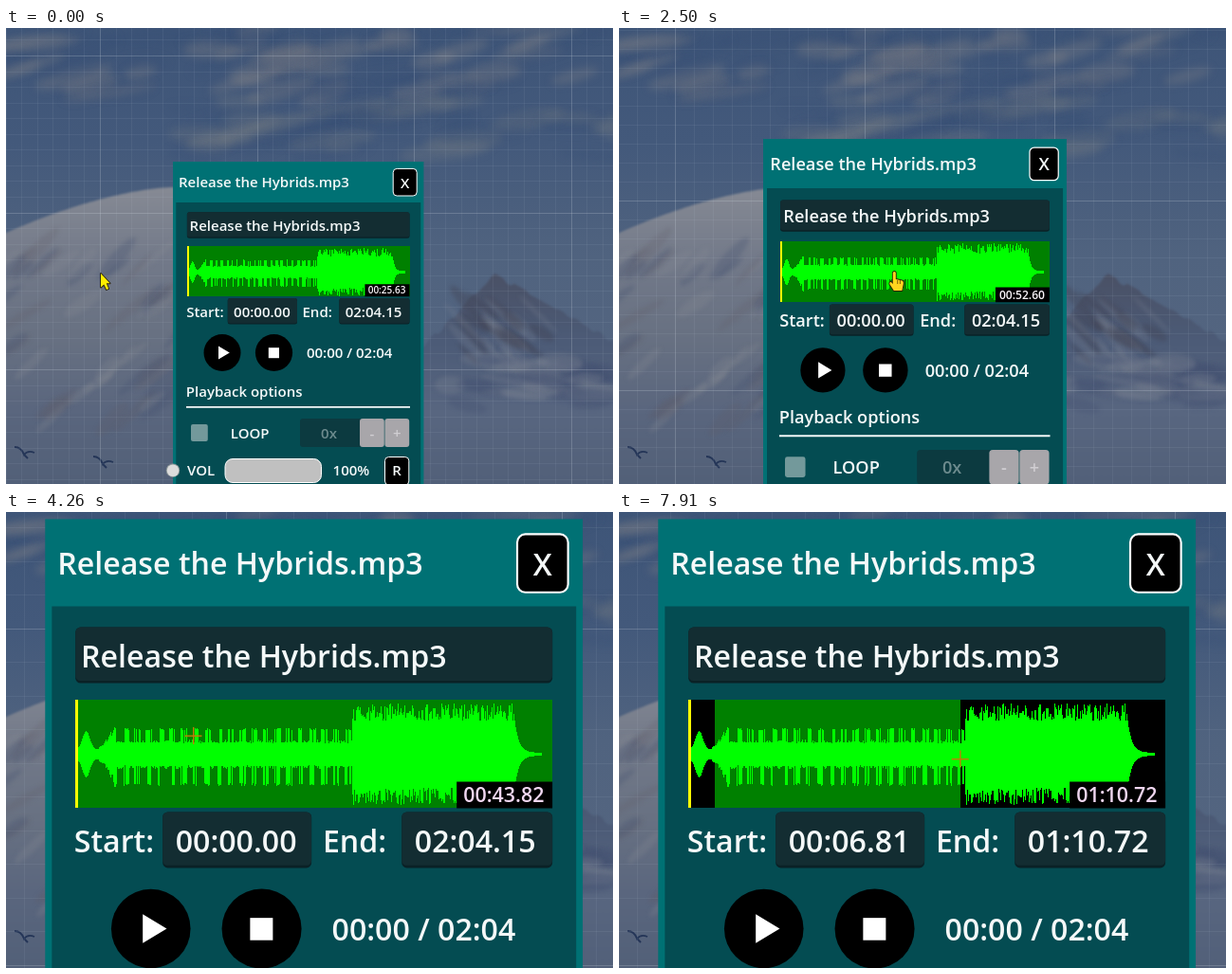
Recreate the animation shown at these times as an HTML page with a canvas. Size 640 px wide and 481 px high, loop 8000 ms.

```html
<!DOCTYPE html>
<html lang="en">
<head>
<meta charset="utf-8">
<title>Audio clip trimming</title>
<style>
html, body { margin: 0; width: 100%; height: 100%; overflow: hidden; background: #46597a; }
canvas { display: block; }
</style>
</head>
<body>
<canvas id="stage" width="640" height="481"></canvas>
<script>
const W = 640, H = 481, LOOP = 8000, STEP = 125.5;
const LENGTH = 124.15, START = 6.81, END = 70.72, IDLE = 25.63;
const FILE = 'Release the Hybrids.mp3';
const ctx = document.getElementById('stage').getContext('2d');

// Waveform box in panel units
const WAVE = { x: 14.9, y: 89, w: 234.6, h: 53.3 };

// Pointer stops: step, x, y
const PATH = [
  [9, 99, 258], [10, 104, 258], [17, 290.3, 257], [23, 290.3, 257], [23.3, 298.85, 263],
  [31, 298.85, 263], [33, 265.4, 256], [34, 197.5, 236], [38, 111, 249], [41, 100.8, 255.5],
  [50, 101, 256], [51, 105.95, 256], [52, 184, 262], [59, 359.7, 260.5]
];

const clamp = (v, lo, hi) => Math.min(hi, Math.max(lo, v));
const mix = (a, b, k) => a + (b - a) * k;
const smooth = k => k * k * (3 - 2 * k);
const noise = n => { const v = Math.sin(n * 127.1 + 11.7) * 43758.5453; return v - Math.floor(v); };
const two = n => String(n).padStart(2, '0');
function clock(sec) {
  const c = Math.round(sec * 100);
  return two(Math.floor(c / 6000)) + ':' + two(Math.floor(c / 100) % 60) + '.' + two(c % 100);
}

function pointerAt(n) {
  const i = PATH.findIndex(p => p[0] > n);
  if (i === 0) return PATH[0].slice(1);
  if (i < 0) return PATH.at(-1).slice(1);
  const [a, ax, ay] = PATH[i - 1], [b, bx, by] = PATH[i];
  const k = smooth((n - a) / (b - a));
  return [mix(ax, bx, k), mix(ay, by, k)];
}

// Each wheel notch enlarges by 1.1 around a slowly drifting focus
function viewAt(n) {
  const level = n < 24 ? clamp(n - 18, 0, 5) : n < 27 ? 7 : 8;
  const s = 1.1 ** level, fx = 289 + 0.6 * level, fy = 254 + 0.46 * level;
  return { level, s, x: mix(fx, 176, s), y: mix(fy, 141, s) };
}

// The readout trails the pointer and holds while zooming
function hoverAt(n) {
  const m = n < 24 ? Math.min(n, 18) : n, v = viewAt(m);
  const p = ((pointerAt(m - 0.7)[0] - v.x) / v.s - WAVE.x) / WAVE.w;
  return p > 0 ? p * LENGTH : IDLE;
}

function fade(g, y0, y1, ...colours) {
  const f = g.createLinearGradient(0, y0, 0, y1);
  colours.forEach((c, i) => f.addColorStop(i / (colours.length - 1), c));
  return f;
}

function makeScenery() {
  const c = document.createElement('canvas');
  c.width = W; c.height = H;
  const g = c.getContext('2d');

  const ridge = (from, to, height, fill) => {
    g.beginPath();
    g.moveTo(from, H);
    for (let x = from; x <= to; x += 4) g.lineTo(x, height(x));
    g.lineTo(to, H);
    g.fillStyle = fill;
    g.fill();
  };
  // Scattered brush strokes inside a box
  const dabs = (count, seed, [x, y, w, h], size, tilt, colours) => {
    for (let i = 0; i < count; i++) {
      const r = k => noise(seed + i * 5 + k);
      g.fillStyle = colours[i % colours.length];
      g.beginPath();
      g.ellipse(x + r(1) * w, y + r(2) * h, size * (0.5 + r(3)), size * (0.12 + 0.2 * r(4)), tilt + r(5) * 0.4 - 0.2, 0, 7);
      g.fill();
    }
  };
  const left = x => 168 + 48 * Math.max(0, 1 - x / 176) ** 1.6;
  const right = x => 258 + Math.abs(x - 515) * (x < 515 ? 1 : 0.55) + 6 * noise(Math.floor(x / 8));

  g.fillStyle = fade(g, 0, H, '#3e5578', '#43597b', '#50637f', '#546580', '#4f5f7a');
  g.fillRect(0, 0, W, H);
  g.filter = 'blur(4px)';
  dabs(70, 40, [-20, 0, 680, 70], 34, -0.15, ['rgba(140,138,136,.28)', 'rgba(52,78,118,.25)']);
  dabs(40, 700, [180, 75, 480, 60], 34, -0.1, ['rgba(140,138,136,.2)', 'rgba(52,78,118,.2)']);
  g.filter = 'blur(1px)';
  ridge(-10, 440, left, fade(g, 168, H, '#868a94', '#727989', '#687182', '#5a667e', '#526078'));
  ridge(420, 650, right, fade(g, 255, H, '#4a5064', '#4c5b77', '#586680', '#526079'));
  g.filter = 'blur(2px)';
  dabs(45, 1300, [-10, 235, 190, 180], 24, -0.7, ['rgba(135,139,148,.25)', 'rgba(70,84,112,.3)', 'rgba(96,92,100,.2)']);
  dabs(26, 1900, [475, 285, 90, 75], 20, 0.75, ['rgba(66,68,86,.4)', 'rgba(125,132,148,.25)']);
  dabs(30, 2500, [430, 350, 220, 50], 30, 0.1, ['rgba(125,132,148,.28)', 'rgba(66,82,112,.3)']);
  g.filter = 'none';

  g.strokeStyle = '#243557';
  g.lineWidth = 1.9;
  for (const [x, y] of [[19, 447], [102, 457]]) {
    g.beginPath();
    g.moveTo(x - 10, y - 5);
    g.quadraticCurveTo(x - 3, y - 5, x, y + 3);
    g.quadraticCurveTo(x + 4, y - 2, x + 11, y + 1);
    g.moveTo(x, y + 3);
    g.lineTo(x + 4, y + 7);
    g.stroke();
  }
  return c;
}
const scenery = makeScenery();

function grid(v) {
  const cell = 16.55 * v.s;
  for (let i = -40; i <= 40; i++) {
    ctx.fillStyle = i % 10 ? 'rgba(200,212,225,.075)' : 'rgba(205,215,225,.23)';
    ctx.fillRect(Math.floor(v.x + 89 * v.s + i * cell), 0, 1, H);
    ctx.fillRect(0, Math.floor(v.y + 54 * v.s + i * cell), W, 1);
  }
}

// Helpers in panel units
function box(x, y, x2, y2, fill, r = 0, border) {
  ctx.beginPath();
  ctx.roundRect(x, y, x2 - x, y2 - y, r);
  ctx.fillStyle = fill;
  ctx.fill();
  if (border) {
    ctx.strokeStyle = border;
    ctx.lineWidth = 1;
    ctx.stroke();
  }
}
function text(str, x, y, { size = 15, fill = '#f4f8f8', align = 'left' } = {}) {
  ctx.font = `600 ${size}px "Open Sans", "Noto Sans", sans-serif`;
  ctx.textAlign = align;
  ctx.fillStyle = fill;
  ctx.fillText(str, x, y);
}
function field(x, y, x2, y2) {
  box(x, y, x2, y2, '#0a2126', 2.5);
  box(x, y, x2, y2 - 1.2, '#132d32', 2.5);
}
function button(label, x, y, x2, y2, base) {
  box(x, y, x2, y2, '#000', 4, '#fff');
  text(label, (x + x2) / 2, base, { align: 'center' });
}
function disc(x, y, r, fill) {
  ctx.beginPath();
  ctx.arc(x, y, r, 0, 7);
  ctx.fillStyle = fill;
  ctx.fill();
}

// Loudness above (side 0) or below (side 1) the axis, p from 0 to 1
function loudness(p, side) {
  const n = noise(Math.floor(p * 470) + side * 900);
  if (p < 0.048) return 0.08 + 0.34 * Math.exp(-(((p - 0.022) / 0.011) ** 2));
  if (p < 0.085) return 0.12 + 0.58 * ((p - 0.048) / 0.037) ** 1.6 * (0.5 + 0.5 * n);
  if (p < 0.58) {
    const beat = (p / 0.0245) % 1;
    return beat < 0.55 && n > 0.35 ? (0.48 + side * 0.1) * (0.85 + 0.15 * n) : 0.2 + 0.06 * n;
  }
  if (p < 0.922) return 0.6 + 0.33 * n;
  return 0.02 + 0.5 * Math.exp((0.922 - p) * 110);
}

// Drawn on whole pixels so that the bars stay crisp
function wave(v, start, end) {
  const x = Math.round(v.x + WAVE.x * v.s), y = Math.round(v.y + WAVE.y * v.s);
  const w = Math.round(WAVE.w * v.s), h = Math.round(WAVE.h * v.s);
  const px = sec => Math.round(sec / LENGTH * w);
  const mid = Math.round(y + h / 2);
  ctx.fillStyle = '#000';
  ctx.fillRect(x, y, w, h);
  ctx.fillStyle = '#008000';
  ctx.fillRect(x + px(start), y, px(end) - px(start), h);
  ctx.fillStyle = '#0f0';
  for (let i = 0; i < w * 0.978; i++) {
    const up = Math.round(loudness(i / w, 0) * h / 2), down = Math.round(loudness(i / w, 1) * h / 2);
    ctx.fillRect(x + i, mid - up, 1, up + down + 1);
  }
  ctx.fillStyle = '#ff0';
  ctx.fillRect(x, y, Math.round(1 + v.s), h);
}

function panel(v, start, end, hover) {
  const local = () => { ctx.save(); ctx.translate(v.x, v.y); ctx.scale(v.s, v.s); };

  local();
  box(0, 0, 264.4, 400, '#007174');
  box(3.3, 42.9, 261.2, 400, '#044c52');
  text(FILE, 6, 27.3);
  button('X', 232.2, 7.4, 257.2, 36, 27.5);
  field(14.9, 53.2, 249.5, 80.7);
  text(FILE, 17.6, 72.9);
  ctx.restore();

  wave(v, start, end);

  local();
  box(202.4, 129.2, 249.5, 142.3, '#000');
  text(clock(hover), 205.7, 139.3, { size: 10, fill: v.level > 7 ? '#f0d6f0' : '#f8f4f8' });

  text('Start:', 14.2, 163.8);
  field(57.8, 144.1, 131, 171.6);
  text(clock(start), 64.1, 163.8);
  text('End:', 136.5, 163.8);
  field(175.4, 144.1, 249.5, 171.6);
  text(clock(end), 181.7, 163.8);

  disc(52, 201.5, 19.5, '#000');
  ctx.fillStyle = '#fff';
  ctx.fill(new Path2D('M48 194.4L59.8 201.5L48 208.6Z'));
  disc(106.5, 201.5, 19.6, '#000');
  box(100.8, 196.2, 112, 207.2, '#fff');
  text('00:00 / 02:04', 141, 207.2);

  text('Playback options', 13.8, 248);
  box(14, 258, 250, 259.7, '#f4f8f8');

  box(19, 277, 36.8, 295, '#73999b', 2);
  text('LOOP', 60.8, 291.8);
  box(134, 271, 200, 301, '#0c3a40', 3);
  text('0x', 164.5, 291.5, { fill: '#6d8b8e', align: 'center' });
  ['-', '+'].forEach((sign, i) => {
    box(197 + i * 26.4, 271, 222.8 + i * 26.4, 301, '#a8a6aa', 3);
    text(sign, 209.8 + i * 26.4, 291.5, { fill: '#d0ced2', align: 'center' });
  });

  disc(0, 325.7, 7.2, '#8a9698');
  disc(0, 325.7, 6.3, '#dcdcdc');
  text('VOL', 15, 331.4);
  box(55, 313.5, 156.5, 338.5, '#c0c0c0', 8, '#fff');
  text('100%', 168.6, 331.4);
  button('R', 223.5, 311.5, 248.8, 341, 331.4);
  ctx.restore();
}

const ARROW = new Path2D('M1 1V15.5L4.3 12.5L7 18L9.2 17L6.8 11.3H10.6Z');
const HAND = new Path2D('M-1.5 1Q0 -1 1.5 1V8L8 9.5Q10 10 9.5 13L8 20H-.5L-5 13Q-5 10.5 -3.5 11L-1.5 13Z');
function pointer(n, v) {
  const [x, y] = pointerAt(n);
  ctx.save();
  ctx.translate(x, y);
  if (n > 31) {
    ctx.fillStyle = '#c47a08';
    ctx.fillRect(-9, -0.5, 18, 1.4);
    ctx.fillRect(-0.5, -9, 1.4, 18);
  } else {
    const over = x > v.x + WAVE.x * v.s;
    const shape = over ? HAND : ARROW;
    ctx.lineJoin = 'round';
    ctx.lineWidth = 1.8;
    ctx.strokeStyle = '#2a2408';
    ctx.stroke(shape);
    ctx.fillStyle = over ? '#ffd51e' : '#ffee00';
    ctx.fill(shape);
    if (over) {
      ctx.fillStyle = '#6a5208';
      ctx.fillRect(3, 9, 0.9, 4);
      ctx.fillRect(5.6, 9, 0.9, 4);
    }
  }
  ctx.restore();
}

// The picture advances in steps, about eight a second
function draw(now) {
  const n = Math.floor((now % LOOP + 25) / STEP);
  const v = viewAt(n);
  ctx.drawImage(scenery, 0, 0);
  grid(v);
  panel(v, n < 48 ? 0 : START, n < 62 ? LENGTH : END, hoverAt(n));
  pointer(n, v);
}

let begin;
function tick(now) {
  begin ??= now;
  draw(now - begin);
  requestAnimationFrame(tick);
}
draw(0);
requestAnimationFrame(tick);
</script>
</body>
</html>
```
